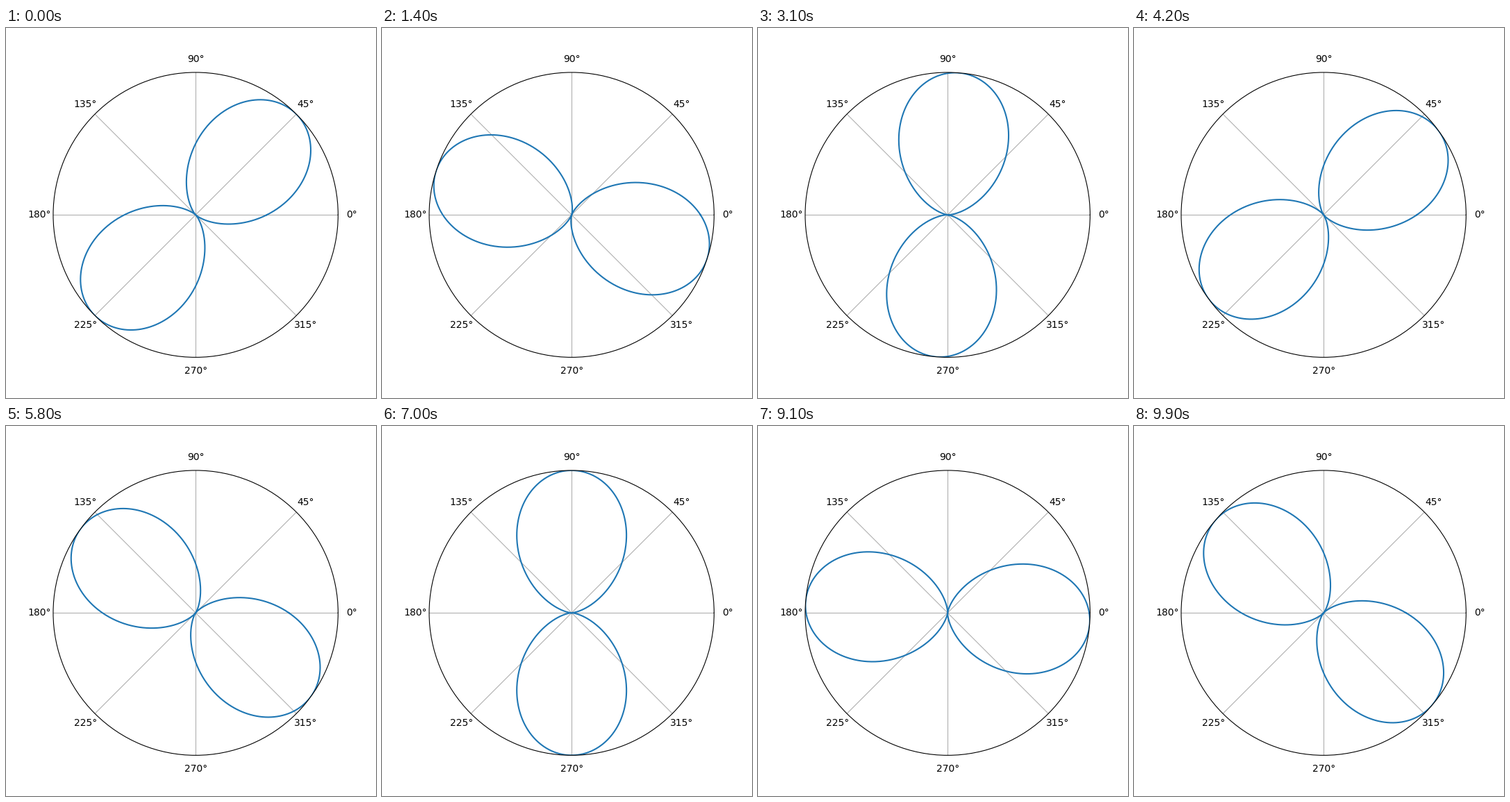
Animation, 533 px wide and 533 px high, one loop 10 s. Source, as a matplotlib script:

```python
import numpy as np
import matplotlib.pyplot as plt
from matplotlib.animation import FuncAnimation

FRAMES = 100
INTERVAL = 100  # ms
START = np.radians(45)
STEP = np.radians(-4.5)

plt.rcParams["font.family"] = "DejaVu Sans"

fig = plt.figure(figsize=(5.33, 5.33), dpi=100)
ax = fig.add_subplot(projection="polar")
ax.set_ylim(0, 1)
ax.set_yticks([])

theta = np.linspace(0, 2 * np.pi, 1000)


def lobes(i):
    """Two-lobed cosine-squared pattern, turning clockwise."""
    return np.cos(theta - START - STEP * i) ** 2


line, = ax.plot(theta, lobes(0), color="#1f77b4", lw=1.5)
ax.set_ylim(0, 1)


def update(i):
    line.set_ydata(lobes(i))
    return line,


anim = FuncAnimation(fig, update, frames=FRAMES, interval=INTERVAL,
                     repeat=True, repeat_delay=0, blit=False)
plt.show()
```
